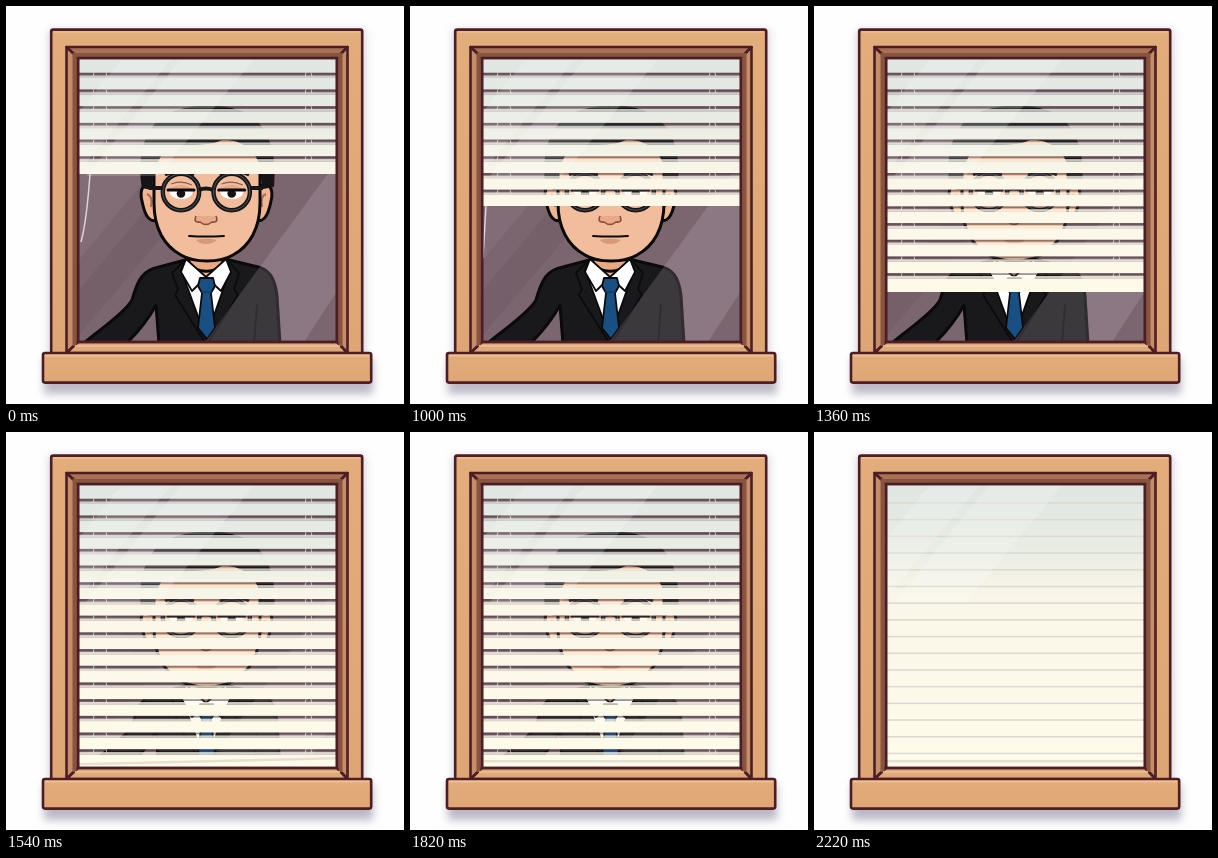
An HTML page for the animation above (3.22 s loop, 398 by 398 pixels).

```html
<!DOCTYPE html>
<html lang="en">
<head>
<meta charset="utf-8">
<title>Closing the blind</title>
<style>
html, body { margin: 0; width: 100%; height: 100%; overflow: hidden; background: #fefefe; }
svg { display: block; width: 100vw; height: 100vh; }
.ink { stroke: #4d1d25; stroke-width: 2.6; stroke-linejoin: round; }
.line { stroke: #0b0a0b; stroke-width: 3; stroke-linejoin: round; stroke-linecap: round; }
.thin { stroke-width: 1.8; }
</style>
</head>
<body>
<svg viewBox="0 0 398 398">
  <defs>
    <clipPath id="pane"><path d="M72 52H331V336H72Z"/></clipPath>
    <linearGradient id="cream" gradientUnits="userSpaceOnUse" x1="0" y1="52" x2="0" y2="336">
      <stop offset="0" stop-color="#dfe6e3"/>
      <stop offset=".22" stop-color="#e8ece3"/>
      <stop offset=".42" stop-color="#faf7e9"/>
      <stop offset="1" stop-color="#fffbea"/>
    </linearGradient>
    <linearGradient id="wood" x1="0" y1="0" x2="0" y2="1">
      <stop offset="0" stop-color="#e2ad7b"/>
      <stop offset="1" stop-color="#dea674"/>
    </linearGradient>
    <filter id="soft" x="-20%" y="-20%" width="140%" height="140%"><feGaussianBlur stdDeviation="4"/></filter>
  </defs>

  <g filter="url(#soft)" fill="#aeacbc">
    <rect x="43" y="24" width="316" height="330" opacity=".55"/>
    <rect x="38" y="352" width="329" height="36" opacity=".85"/>
  </g>
  <rect class="ink" x="45.2" y="23.6" width="311" height="326" rx="2" fill="url(#wood)"/>
  <path d="M48 26H354" stroke="#efc092" stroke-width="1.6"/>

  <g clip-path="url(#pane)">
    <rect x="72" y="52" width="259" height="284" fill="#7b6670"/>
    <path d="M72 52H240L72 255Z" fill="#826d76"/>
    <path d="M72 285L185 150H225L72 330Z" fill="#75606a"/>

    <g id="person">
      <path class="line" d="M78 337C92 325 119 307 126 294C132 273 137 264 153 261L183 253H219L248 260C263 262 269 272 271 290L274 338H153L150 299C143 312 133 325 120 338Z" fill="#19191b"/>
      <path d="M182 250L200 285L218 250Z" fill="#efb28f"/>
      <path class="line thin" d="M179 254L175 264L200 332L224 264L220 254L201 273Z" fill="#fff"/>
      <path class="line" d="M183 247V257C190 268 211 268 217 257V247" fill="#e9a985"/>
      <path class="line thin" d="M180 253L175 266L186 285L200 271ZM220 253L225 266L215 285L200 271Z" fill="#fff"/>
      <path class="line thin" d="M194 272H207L209 280L205 287L209 322L201 333L192 322L196 287L192 280Z" fill="#195083"/>
      <path d="M195 286H206" stroke="#103a63" stroke-width="1.5"/>
      <path class="line thin" d="M176 257L166 267L172 283L169 289L198 335M224 257L233 267L228 283L232 289L203 335M150 299L153 337M251 299L248 337" fill="none"/>
      <path class="line" d="M148 181C138 174 133 183 136 195C139 211 144 217 152 214ZM253 181C263 174 268 183 265 195C262 211 257 217 249 214Z" fill="#f0b592"/>
      <path d="M141 188Q147 190 145 201M260 188Q254 190 256 201" fill="none" stroke="#a96c50" stroke-width="2"/>
      <path class="line" d="M148 150Q155 118 201 118Q247 118 254 150V197C254 222 244 240 227 249C214 257 188 257 175 249C158 240 148 222 148 197Z" fill="#f2bd9d"/>
      <path d="M136 182C131 154 137 125 155 112C174 97 222 95 243 109C264 122 271 149 268 181L257 183L253 158C249 144 235 133 216 134C198 143 168 135 159 145C150 154 149 168 145 184Z" fill="#151316"/>
      <path d="M159 169Q173 162 188 169M214 169Q229 162 243 169" fill="none" stroke="#19161a" stroke-width="3"/>
      <g id="eye">
        <path d="M163 185H187Q186 193 175 193Q165 193 163 185Z" fill="#fff"/>
        <circle cx="175" cy="187.5" r="4.3" fill="#17110f"/>
        <path d="M162 184Q175 174 188 184Z" fill="#e3a987"/>
        <path class="line" d="M162 184H188"/>
        <path d="M165 178Q175 174 186 179" fill="none" stroke="#8b5a48" stroke-width="1.2"/>
        <circle cx="175" cy="186" r="18.2" fill="none" stroke="#161518" stroke-width="4.4"/>
        <circle cx="175" cy="186" r="18.2" fill="none" stroke="#56535a" stroke-width="1"/>
      </g>
      <use href="#eye" x="50.7"/>
      <path d="M193 184Q200 181 207 184M143 182H157M244 182H257" fill="none" stroke="#161518" stroke-width="4"/>
      <path d="M190 210Q187 217 194 216Q200 221 206 216Q213 217 210 210" fill="#e9a887" stroke="#8c4f3b" stroke-width="1.6"/>
      <path d="M190 234Q200 231 211 234Q207 238 200 238Q193 238 190 234Z" fill="#d69a78"/>
      <path class="line thin" d="M183 230Q200 231 218 230" fill="none"/>
    </g>

    <path d="M323 166L199 336H298L331 285V166Z" fill="#d8c8d0" opacity=".18"/>
    <path id="cord" fill="none" stroke="#d9d4d8" stroke-width="1.5"/>
    <g id="blind"></g>
    <g fill="#fff">
      <path d="M117 52H166L72 167V107Z" opacity=".16"/>
      <path d="M176 52H249L152 170H80Z" opacity=".18"/>
    </g>
  </g>

  <g class="ink">
    <path d="M60.5 41H341.5L331 52H72Z" fill="#a87154"/>
    <path d="M60.5 41L72 52V336L60.5 347Z" fill="#c68e67"/>
    <path d="M341.5 41L331 52V336L341.5 347Z" fill="#c68e67"/>
    <path d="M60.5 347L72 336H331L341.5 347Z" fill="#dea878"/>
  </g>
  <path d="M68.5 340V49H334.5V340" fill="none" stroke="#87543f" stroke-width="4"/>
  <path d="M69 340H334" stroke="#ecc096" stroke-width="1.5"/>
  <path class="ink" d="M72 52H331V336H72Z" fill="none"/>
  <rect class="ink" x="37" y="347" width="328.2" height="29.6" rx="2" fill="url(#wood)"/>
  <path d="M39 349.6H363" stroke="#eec092" stroke-width="1.6"/>
</svg>
<script>
const LOOP = 3220, PITCH = 16.7, FIRST = 68.2, OPEN = 2.8;

// start ms, bottom edge, gap height, tilt of the bottom rail, cord
const steps = [
  [0, 168, OPEN, 0, "M84 168C82 196 80 218 75 236"],
  [600, 164, OPEN, 0, "M82 164C80 196 76 222 74 252"],
  [1000, 200, OPEN, 0, "M76 200L73 252"],
  [1180, 240, OPEN, 0, ""],
  [1360, 286, OPEN, 0, ""],
  [1540, 336, OPEN, 6, ""],
  [1720, 336, OPEN, 2, ""],
  [1820, 336, OPEN, 0, ""],
  [2120, 336, 1.4, 0, ""],
  [2220, 336, 0, 0, ""]
];

const blind = document.getElementById("blind");
const cord = document.getElementById("cord");
const band = (y, h, fill, alpha = 1) =>
  `<rect x="73" y="${y}" width="257" height="${h}" fill="${fill}" opacity="${alpha}"/>`;

// ladder strings glimpsed between two slats
const strings = (y, h) => [88, 100, 300, 305].map((x, i) =>
  `<path d="M${x} ${y}l${i % 2 ? 1 : -1} ${h + 1}" stroke="#efedeb" opacity=".7"/>`).join("");

function drawBlind([, bottom, gap, tilt, path]) {
  let out = gap ? "" : band(52, bottom - 52, "url(#cream)");
  let top = 52;
  for (let y = FIRST; y < bottom - 12.5; y += PITCH) {
    if (!gap) {
      out += band(y + 2, 1.5, "#ddd8d0");
      continue;
    }
    const start = y - gap / 2, end = y + gap / 2;
    out += band(top, start - top, "url(#cream)");
    out += band(start, Math.min(1.8, gap), "#4b3743", .55);
    out += band(end, 2.4, "url(#cream)", .78);
    out += strings(start, gap);
    top = end + 2.4;
  }
  if (gap) out += band(top, bottom - top, "url(#cream)");
  if (bottom === 336) {
    const left = 328 + tilt / 2, right = 328 - tilt / 2;
    out += `<path d="M73 ${left}L330 ${right}v2.5L73 ${left + 2.5}Z" fill="#e6dfd2"/>`;
  }
  blind.innerHTML = out;
  cord.setAttribute("d", path);
}

const begin = performance.now();
let shown;
function tick(now) {
  const t = Math.max(0, now - begin) % LOOP;
  const step = steps.findLast(s => s[0] <= t);
  if (step !== shown) drawBlind(shown = step);
  requestAnimationFrame(tick);
}
tick(begin);
</script>
</body>
</html>
```
